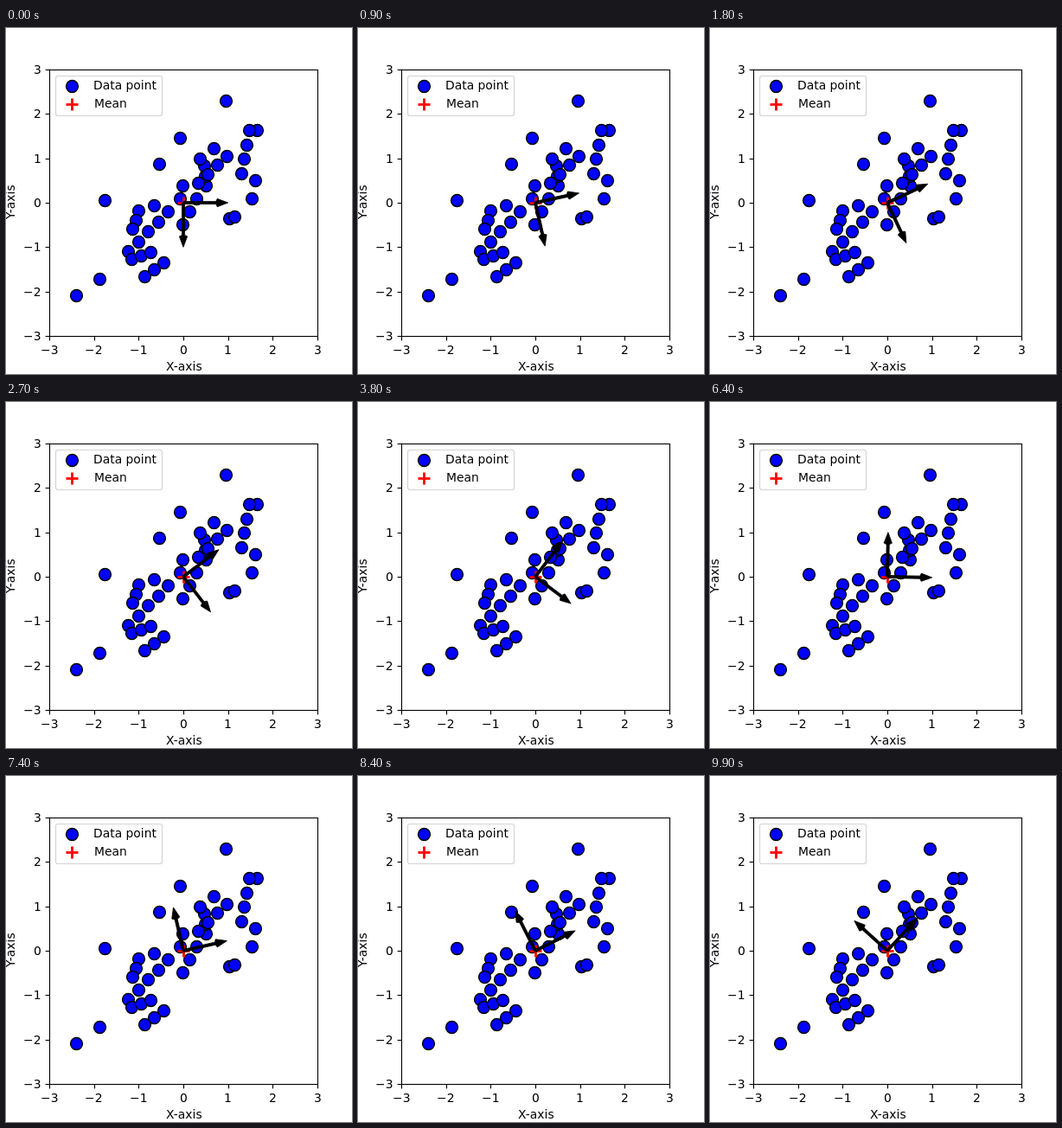
These frames come from a looping animation (400 px wide and 400 px high, 10000 ms). An HTML page with a canvas:

```html
<!DOCTYPE html>
<html lang="en">
<head>
<meta charset="utf-8">
<title>Rotating axes over a scatter plot</title>
<style>
html, body { margin: 0; width: 100%; height: 100%; overflow: hidden; background: #fff; }
canvas { display: block; }
</style>
</head>
<body>
<canvas id="stage" width="400" height="400"></canvas>
<script>
const ctx = document.getElementById("stage").getContext("2d");
const LOOP = 10000, STEP = 100;
const TURN = 137.6 * Math.PI / 180;   // total rotation over one loop
const LEFT = 50, RIGHT = 360, TOP = 48, BOTTOM = 356;
const CX = 205, CY = 202;
const UX = (RIGHT - LEFT) / 6, UY = (BOTTOM - TOP) / 6;
const GAP = 14.6;                     // usual distance between neighbours

// Outlying points of the cloud
const outliers = [
  [81, 309], [108, 290], [114, 199], [177, 157], [201, 127], [254, 84],
  [290, 118], [288, 176], [284, 197], [258, 220], [264, 218], [171, 205]
];

// The dense part: strands from one end to the other, filled evenly
const strands = [
  [187, 212, 141, 258], [145, 267, 167, 259], [153, 211, 146, 232],
  [182, 271, 160, 287], [281, 118, 272, 168], [204, 227, 220, 197],
  [231, 182, 229, 159], [222, 179, 255, 148], [224, 151, 240, 139],
  [204, 182, 201, 197]
];

function fill([x1, y1, x2, y2]) {
  const n = Math.round(Math.hypot(x2 - x1, y2 - y1) / GAP);
  return Array.from({ length: n + 1 }, (_, i) => [
    Math.round(x1 + (x2 - x1) * i / n),
    Math.round(y1 + (y2 - y1) * i / n)
  ]);
}

const dots = [...outliers, ...strands.flatMap(fill)];

function line(x1, y1, x2, y2) {
  ctx.beginPath();
  ctx.moveTo(x1, y1);
  ctx.lineTo(x2, y2);
  ctx.stroke();
}

// Markers sit on pixel centres
function dot(x, y) {
  ctx.beginPath();
  ctx.arc(x + 0.5, y + 0.5, 6.94, 0, 2 * Math.PI);
  ctx.fillStyle = "#00f";
  ctx.fill();
  ctx.strokeStyle = "#000";
  ctx.lineWidth = 1.4;
  ctx.stroke();
}

function cross(x, y) {
  ctx.strokeStyle = "#f00";
  ctx.lineWidth = 2.8;
  line(x - 6.5, y + 0.5, x + 7.5, y + 0.5);
  line(x + 0.5, y - 6.5, x + 0.5, y + 7.5);
}

// share: part of the text that lies left of x
function text(s, x, y, share = 0) {
  ctx.font = '13.89px "DejaVu Sans", sans-serif';
  ctx.fillStyle = "#000";
  ctx.fillText(s, Math.round(x - share * ctx.measureText(s).width), y);
}

function arrow(angle) {
  const dx = Math.cos(angle) * UX, dy = -Math.sin(angle) * UY;
  const len = Math.hypot(dx, dy), w = 3.1;
  const neck = len - 4.5 * w, back = len - 4 * w;
  ctx.save();
  ctx.translate(CX, CY);
  ctx.rotate(Math.atan2(dy, dx));
  ctx.beginPath();
  ctx.moveTo(0, -w / 2);
  ctx.lineTo(neck, -w / 2);
  ctx.lineTo(back, -1.5 * w);
  ctx.lineTo(len, 0);
  ctx.lineTo(back, 1.5 * w);
  ctx.lineTo(neck, w / 2);
  ctx.lineTo(0, w / 2);
  ctx.closePath();
  ctx.fillStyle = ctx.strokeStyle = "#000";
  ctx.lineWidth = 0.8;
  ctx.lineJoin = "round";
  ctx.fill();
  ctx.stroke();
  ctx.restore();
}

function axes() {
  ctx.strokeStyle = "#000";
  ctx.lineWidth = 1.1;
  ctx.strokeRect(LEFT + 0.5, TOP + 0.5, RIGHT - LEFT, BOTTOM - TOP);
  for (let v = -3; v <= 3; v++) {
    const x = Math.round(CX + v * UX), y = Math.round(CY - v * UY);
    const label = String(v).replace("-", "\u2212");
    line(x + 0.5, BOTTOM + 0.5, x + 0.5, BOTTOM + 5.4);
    line(LEFT + 0.5, y + 0.5, LEFT - 4.4, y + 0.5);
    text(label, CX + v * UX, 377, 0.5);
    text(label, 40.8, y + 5, 1);
  }
  text("X-axis", CX + 1, 396, 0.5);
  ctx.save();
  ctx.translate(10, CY);
  ctx.rotate(-Math.PI / 2);
  text("Y-axis", 1, 0, 0.5);
  ctx.restore();
}

function legend() {
  ctx.beginPath();
  ctx.roundRect(57.5, 55.5, 123, 46, 2.8);
  ctx.fillStyle = "rgba(255,255,255,0.8)";
  ctx.fill();
  ctx.strokeStyle = "#d4d4d4";
  ctx.lineWidth = 1.2;
  ctx.stroke();
  dot(76, 67);
  cross(76, 88);
  text("Data point", 101, 71);
  text("Mean", 102, 92);
}

function draw(ms) {
  const step = Math.floor(ms / STEP);
  const angle = TURN * step / (LOOP / STEP - 1);
  ctx.fillStyle = "#fff";
  ctx.fillRect(0, 0, 400, 400);
  for (const [x, y] of dots) dot(x, y);
  cross(CX, CY);
  arrow(angle);
  arrow(angle - Math.PI / 2);
  axes();
  legend();
}

const start = performance.now();
function tick() {
  draw((performance.now() - start) % LOOP);
  requestAnimationFrame(tick);
}
tick();
</script>
</body>
</html>
```
